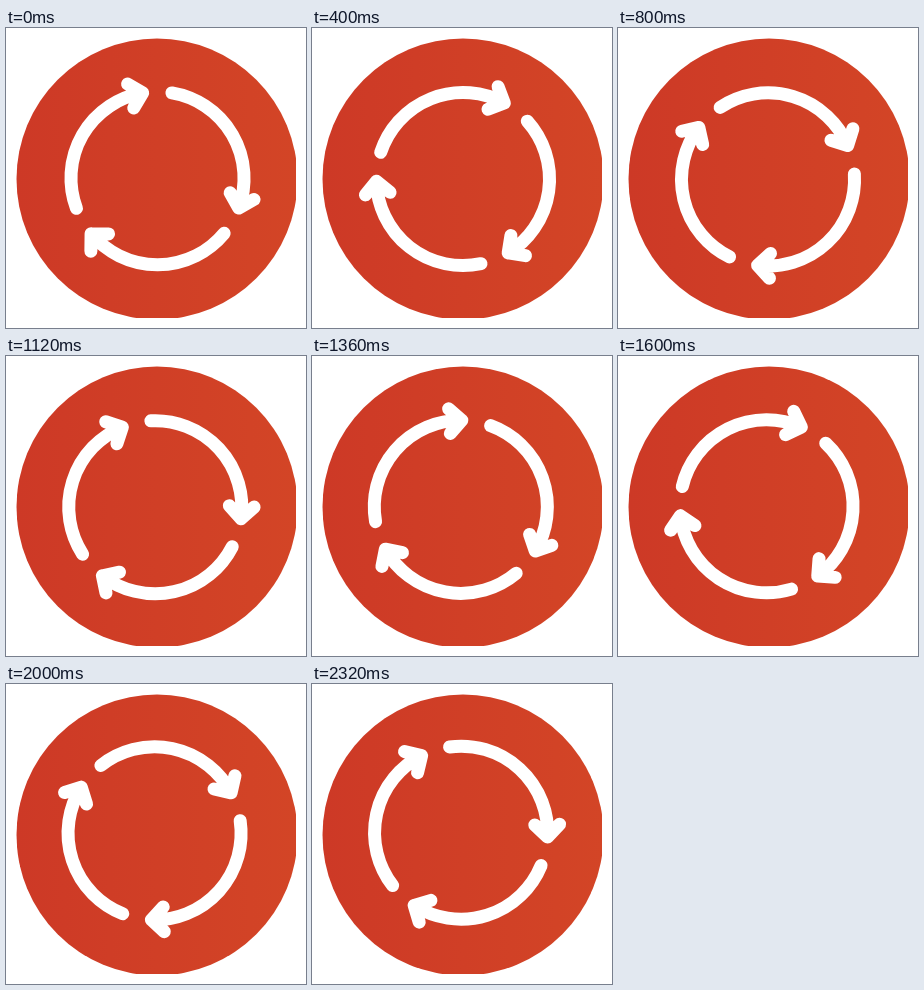
An HTML page that plays this animation: 300 by 300 pixels, repeating every 2400 ms.

```html
<!DOCTYPE html>
<html lang="en">
<head>
<meta charset="utf-8">
<title>Rotating arrows</title>
<style>
  html, body { margin: 0; width: 100%; height: 100%; overflow: hidden; background: #fff; }
  svg { display: block; width: 100%; height: 100%; }
</style>
</head>
<body>
<svg viewBox="0 0 300 300">
  <defs>
    <linearGradient id="red">
      <stop offset="0" stop-color="#cd3926"/>
      <stop offset="1" stop-color="#d34526"/>
    </linearGradient>
    <clipPath id="edge"><rect width="290" height="290"/></clipPath>
    <path id="arrow" d="M86.5 0A86.5 86.5 0 0 1 -15.8 85.1M-4.8 98.7L-15.8 85.1L-2.2 74.1"/>
  </defs>
  <circle cx="151" cy="151" r="140.5" fill="url(#red)" clip-path="url(#edge)"/>
  <g id="wheel" fill="none" stroke="#fff" stroke-width="13" stroke-linecap="round" stroke-linejoin="round">
    <g transform="translate(151.5 150.2) rotate(-80.4)">
      <use href="#arrow"/>
      <use href="#arrow" transform="rotate(120)"/>
      <use href="#arrow" transform="rotate(240)"/>
    </g>
  </g>
</svg>
<script>
  const LOOP = 2400, STEP = 80;
  const SPEED = 240 / 2500; // degrees per ms; the loop ends just short of 240 degrees
  const wheel = document.getElementById('wheel');
  const start = performance.now();

  function draw() {
    const t = (performance.now() - start) % LOOP;
    const angle = Math.floor(t / STEP) * STEP * SPEED;
    // The pivot lies slightly off the ring's centre, so the ring wobbles.
    wheel.setAttribute('transform', `rotate(${angle} 150 149.9)`);
    requestAnimationFrame(draw);
  }
  draw();
</script>
</body>
</html>
```
